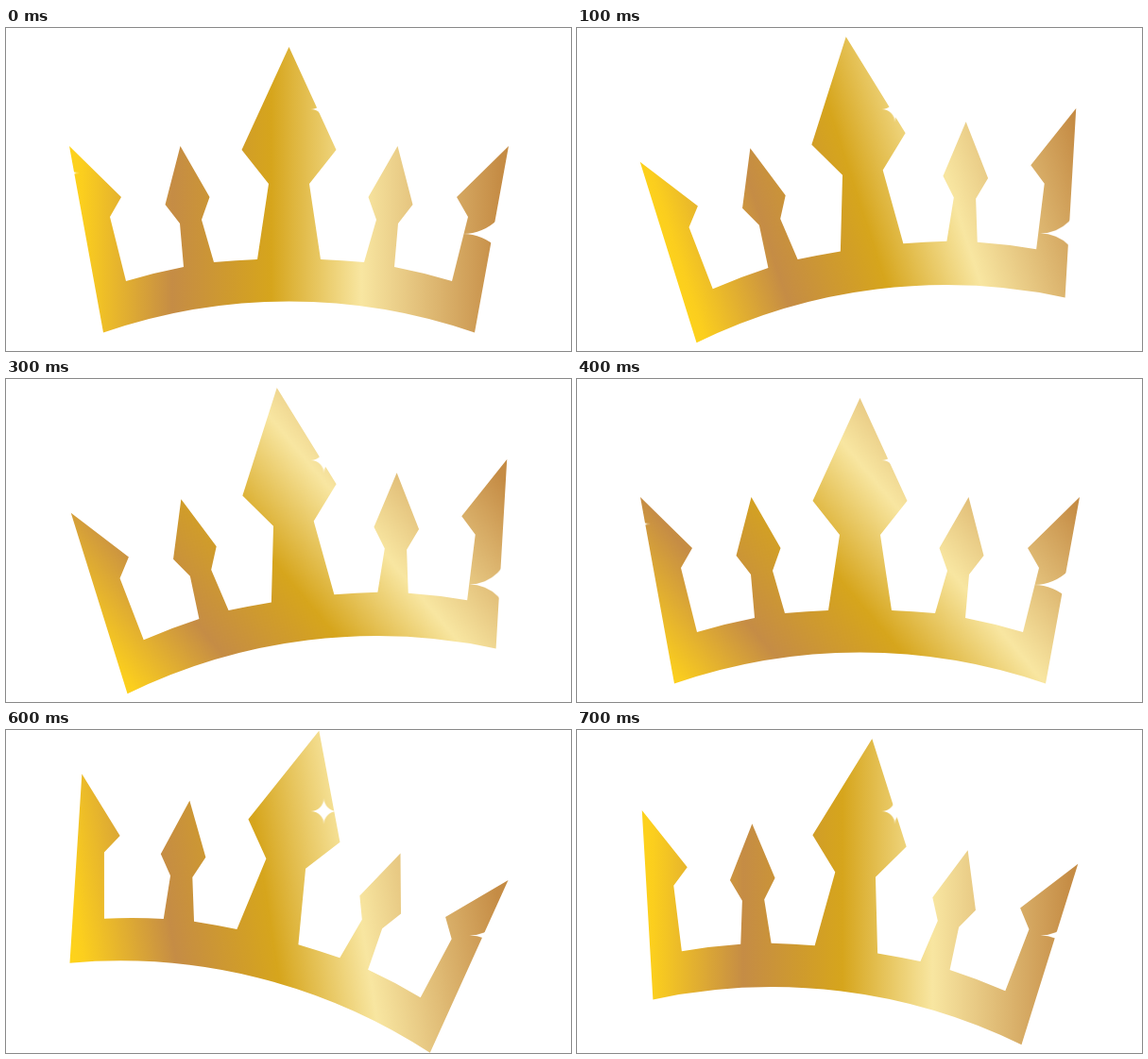
An HTML page for the animation above (0.8 s loop, 598 by 342 pixels).

```html
<!DOCTYPE html>
<html lang="en">
<head>
<meta charset="utf-8">
<title>Golden crown</title>
<style>
html, body { margin: 0; width: 100%; height: 100%; overflow: hidden; background: #fff; }
svg { display: block; width: 100vw; height: 100vh; }
.crown, .gold { transform-origin: 299.5px 171px; }
.crown { animation: sway 800ms step-end infinite; }
.gold { animation: sheen 800ms step-end infinite; }
.right { animation: right 400ms step-end infinite; }
.left { animation: left 400ms step-end infinite; }

/* The tilted crown stays centred on the stage by its bounding box */
@keyframes sway {
  0%, 100% { transform: none; }
  12.5% { transform: translate(3.6px, -12px) rotate(-7deg); }
  25% { transform: translate(4.7px, -23.7px) rotate(-14deg); }
  37.5% { transform: translate(5.6px, -12px) rotate(-7deg); }
  50% { transform: none; }
  62.5% { transform: translate(-5.6px, -12px) rotate(7deg); }
  75% { transform: translate(-4.7px, -23.7px) rotate(14deg); }
  87.5% { transform: translate(-5.6px, -12px) rotate(7deg); }
}
@keyframes sheen {
  0%, 100% { transform: none; }
  12.5% { transform: rotate(-18deg) translateX(14px); }
  25% { transform: rotate(-30deg) translateX(3px); }
  37.5% { transform: rotate(-40deg) translateX(-8px); }
  50% { transform: rotate(-40deg) translateX(-24px); }
  62.5% { transform: rotate(-21deg) translateX(-13px); }
  75% { transform: rotate(-9deg) translateX(-6px); }
  87.5% { transform: none; }
}
@keyframes right {
  0%, 100% { transform: translate(535px, 218px) scale(51); }
  25% { transform: translate(533px, 217.5px) scale(42.5); }
}
@keyframes left {
  0%, 100% { transform: translate(60px, 153.5px) scale(18); }
  25% { transform: translate(60px, 153.5px) scale(10); }
}
</style>
</head>
<body>
<svg viewBox="0 0 598 342">
  <defs>
    <linearGradient id="metal" gradientUnits="userSpaceOnUse" x1="67" y1="0" x2="532" y2="0">
      <stop offset="0" stop-color="#fed31b"/>
      <stop offset=".03" stop-color="#fbce1e"/>
      <stop offset=".235" stop-color="#c58c45"/>
      <stop offset=".46" stop-color="#d6a51c"/>
      <stop offset=".665" stop-color="#f8e6a1"/>
      <stop offset=".98" stop-color="#c58c45"/>
    </linearGradient>
    <clipPath id="shape">
      <path class="crown" d="M67 125L122 179L110 200L127 268Q157 259 188 253L184 207L168.500 187L184.500 125L215.500 179L207 203L220 248Q243 246 266 245L278 165L249.500 129L299.500 20L349.500 129L321 165L333 245Q356 246 379 248L392 203L383.500 179L414.500 125L430.500 187L415 207L411 253Q442 259 472 268L489 200L477 179L532 125L496 322.500A601 601 0 0 0 103 322.500Z"/>
    </clipPath>
    <path id="star" d="M-1 0A1 1 0 0 0 0-1A1 1 0 0 0 1 0A1 1 0 0 0 0 1A1 1 0 0 0-1 0Z"/>
  </defs>
  <g clip-path="url(#shape)">
    <rect class="gold" x="-300" y="-400" width="1200" height="1150" fill="url(#metal)"/>
  </g>
  <g fill="#fff">
    <use class="left" href="#star"/>
    <use href="#star" transform="translate(336.500 86) scale(14)"/>
    <use class="right" href="#star"/>
  </g>
</svg>
</body>
</html>
```
